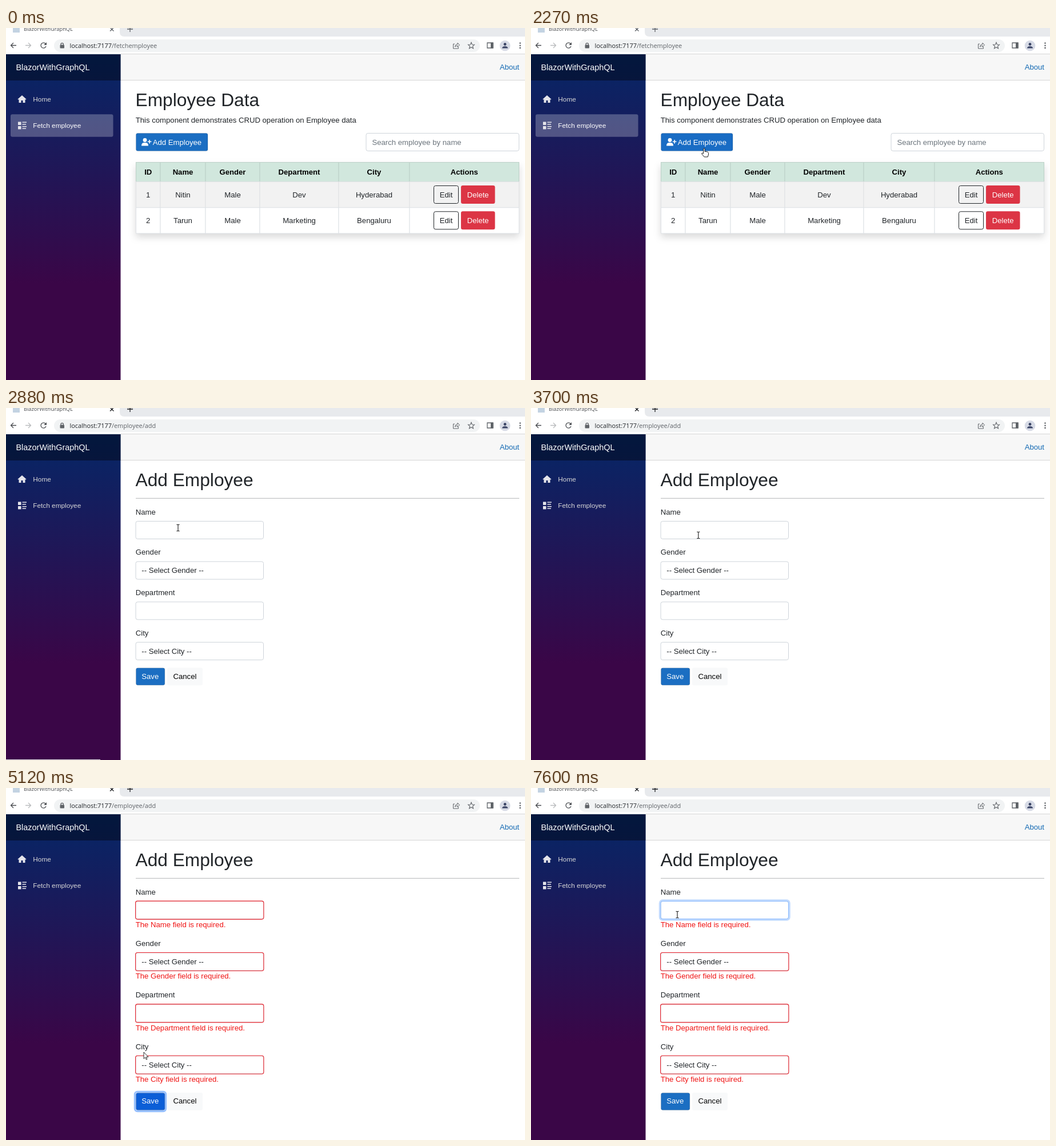
An HTML page for the animation above (8000 ms loop, 908 by 617 pixels).

```html
<!DOCTYPE html>
<html lang="en">
<head>
<meta charset="utf-8">
<title>Employee form</title>
<style>
html, body { margin: 0; height: 100%; overflow: hidden; background: #fff; }
svg { display: block; width: 100vw; height: 100vh; }
text { font: 13.13px "Liberation Sans", Arial, sans-serif; fill: #212529; white-space: pre; }
.chrome { font-family: "Open Sans", "Noto Sans", sans-serif; font-size: 10.9px; }
.title { font-size: 31.7px; }
.brand { font-size: 14.43px; fill: #fff; }
.nav { font-size: 11.8px; fill: #d7d7d7; }
.mid { text-anchor: middle; }
.head { font-weight: bold; fill: #000; }
.light { fill: #fff; }
.error { fill: #f01414; }
.line { fill: none; stroke: #5f6368; stroke-width: 1.3; }
.input { fill: #fff; stroke: #ced4da; }
.btn { stroke: #0002; }
.ring { fill: none; stroke-width: 3.3; }
</style>
</head>
<body>
<svg viewBox="0 0 908 617" preserveAspectRatio="none">
  <defs>
    <linearGradient id="side" x2="0" y2="1">
      <stop stop-color="#052767"/><stop offset=".7" stop-color="#3a0647"/>
    </linearGradient>
    <filter id="shadow" x="-10%" y="-20%" width="120%" height="160%">
      <feDropShadow dx="0" dy="6.6" stdDeviation="6.5" flood-opacity=".15"/>
    </filter>
  </defs>

  <!-- browser bar -->
  <path fill="#e8eaed" d="M199 0H908V15H207Q199 15 199 7z"/>
  <rect x="12" width="12" height="8" fill="#c3d3e2"/>
  <text class="chrome" x="31" y="5" style="font-size:9.25px;fill:#45474a">BlazorWithGraphQL</text>
  <path id="tabMarks" class="line" d="M182-1l6.5 6.5m0-6.5l-6.5 6.5M212 2h10M217-3v10"/>
  <rect x="84" y="20" width="745" height="22" rx="11" fill="#f1f3f4"/>
  <path class="line" d="M18 30.500H8.500m4.500-4.500-4.500 4.500 4.500 4.500" style="stroke:#4a4d51"/>
  <path class="line" d="M34 30.500h9.500m-4.500-4.500 4.500 4.500-4.500 4.500" style="stroke:#babcbe"/>
  <path class="line" d="M69.500 28a4.600 4.600 0 1 0 .5 4" style="stroke:#4a4d51"/>
  <path d="M71 25v4.800h-4.800z" fill="#4a4d51"/>
  <rect x="94.500" y="29.500" width="7.500" height="6" rx="1" fill="#5f6368"/>
  <path class="line" d="M96 30v-1.500a2.200 2.200 0 0 1 4.400 0V30"/>
  <text class="chrome" x="111.500" y="34.500">localhost:7177<tspan id="path" fill="#5f6368"></tspan></text>
  <path class="line" d="M785 28h-2.500v8h9v-2.500M785.500 33q.5-4.500 4.500-4.500v-2.500l3.500 3.800-3.500 3.700v-2.500q-3 0-4.500 2z" style="stroke-width:1"/>
  <path class="line" d="M814 25.300l1.500 3.700 4 .3-3 2.600 1 4-3.500-2.200-3.500 2.200 1-4-3-2.600 4-.3z" style="stroke-width:1.100"/>
  <path class="line" d="M842 26h10v9h-10z"/><path d="M848 25.500h4.500v10H848z" fill="#5f6368"/>
  <circle cx="873" cy="31" r="9.300" fill="#d7dbe6"/>
  <g fill="#3c4667"><circle cx="873" cy="28.500" r="2.400"/><path d="M868 35.500q0-3.500 5-3.500t5 3.500z"/></g>
  <g fill="#5f6368"><circle cx="899.500" cy="26.500" r="1.300"/><circle cx="899.500" cy="30.700" r="1.300"/><circle cx="899.500" cy="34.900" r="1.300"/></g>

  <!-- page frame -->
  <path fill="#f7f7f7" d="M200 46h708v45H200z"/>
  <path fill="#d6d5d5" d="M200 45h708v1H200zM200 91h708v1H200z"/>
  <text x="863.700" y="73" style="fill:#1269b3">About</text>
  <rect y="46" width="200.500" height="574" fill="url(#side)"/>
  <rect y="46" width="200.500" height="46" fill="#0006"/>
  <text class="brand" x="17.500" y="74">BlazorWithGraphQL</text>
  <rect id="active" x="8" y="151.300" width="179.500" height="39.500" rx="3.300" fill="#ffffff40"/>
  <g fill="#e4e4ea">
    <path d="M28 118l7.500 6.800-1 1-1-.8v6h-4v-4h-3v4h-4v-6l-1 .8-1-1z"/>
    <path d="M21 164.500h5.500v5.500H21zM21 172h5.500v5.500H21zM28.500 164.500H36v1.600h-7.500zM28.500 168H35v1.600h-6.500zM28.500 172H36v1.600h-7.500zM28.500 175.500H35v1.600h-6.500z"/>
  </g>
  <text class="nav" x="47.300" y="129">Home</text>
  <text class="nav" id="fetch" x="47.300" y="175">Fetch employee</text>

  <g id="listPage">
    <text class="title" x="226.500" y="137">Employee Data</text>
    <text x="226.800" y="165.600">This component demonstrates CRUD operation on Employee data</text>
    <rect class="ring" id="addRing" x="225.400" y="182.400" width="129.200" height="35" rx="4.600" stroke="#98c1fe"/>
    <rect class="btn" id="add" x="227.500" y="184.500" width="125.500" height="31" rx="3"/>
    <g fill="#fff">
      <circle cx="243" cy="196.500" r="3.400"/>
      <path d="M237 206.500q0-5.500 4.500-5.500h3q4.500 0 4.500 5.500zM250.300 196h1.600v2.500h2.500v1.600h-2.500v2.500h-1.600v-2.500h-2.500v-1.600h2.500z"/>
    </g>
    <text class="light" x="256.800" y="204.600">Add Employee</text>
    <rect class="input" x="630" y="184.500" width="267.500" height="31" rx="3.300"/>
    <text x="640.500" y="204.600" style="fill:#6c757d">Search employee by name</text>
    <g id="table"></g>
  </g>

  <g id="formPage">
    <text class="title" x="226.500" y="137">Add Employee</text>
    <path d="M227 157.800h671v1.200H227z" fill="#c3c4c5"/>
    <g id="fields"></g>
    <rect id="nameRing" class="ring" x="225.400" y="196.900" width="226.700" height="34.200" rx="4.800" stroke="#c2dbfe"/>
    <rect id="nameFocus" x="227" y="198.500" width="223.500" height="31" rx="3.300" fill="none" stroke="#86b7fe"/>
    <path id="caret" d="M237 206h1v15h-1z"/>
    <g id="buttons">
      <rect class="ring" id="saveRing" x="225.400" y="453.600" width="54.200" height="34.300" rx="4.600" stroke="#98c1fe"/>
      <rect class="btn" id="save" x="227.500" y="455.700" width="50.300" height="30" rx="3"/>
      <text class="light" x="237.300" y="474.600">Save</text>
      <rect x="282" y="455.200" width="62" height="31" rx="3.300" fill="#f8f9fa"/>
      <text x="292.500" y="474.600" style="fill:#000">Cancel</text>
    </g>
  </g>
  <path id="status" d="M0 616h165v1H0z" fill="#e4e6ea"/>
  <path id="cursor" stroke="#000"/>
</svg>
<script>
const $ = id => document.getElementById(id);
const show = (id, alpha) => $(id).style.opacity = +alpha;

const edges = [227.5, 270, 349, 444, 582, 706, 897.5];
const rows = [
  ['ID', 'Name', 'Gender', 'Department', 'City', 'Actions'],
  ['1', 'Nitin', 'Male', 'Dev', 'Hyderabad'],
  ['2', 'Tarun', 'Male', 'Marketing', 'Bengaluru'],
];
const bands = [
  [235.5, 34, '#d1e7dd', '#bcd0c7'],
  [269.5, 45.3, '#f2f2f2', '#dfe1e3'],
  [314.8, 45.2, '#fff', '#dee2e6'],
];
const tableRow = (cells, r) => {
  const [y, h, fill, stroke] = bands[r], base = y + h / 2 + 4.6, top = y + 7;
  const boxes = edges.slice(0, 6).map((x, i) =>
    `<rect x="${x}" y="${y}" width="${edges[i + 1] - x}" height="${h}" fill="${fill}" stroke="${stroke}"/>`);
  const labels = cells.map((cell, i) =>
    `<text class="mid ${r ? '' : 'head'}" x="${(edges[i] + edges[i + 1]) / 2}" y="${base}">${cell}</text>`);
  const actions = r ? `
    <rect x="748.5" y="${top}" width="43" height="31" rx="3" fill="none" stroke="#212529"/>
    <text class="mid" x="770" y="${base}">Edit</text>
    <rect x="796" y="${top - .5}" width="59.500" height="32" rx="3.300" fill="#dc3545"/>
    <text class="mid light" x="825.700" y="${base}">Delete</text>` : '';
  return boxes.join('') + labels.join('') + actions;
};
$('table').innerHTML =
  '<rect x="227" y="235" width="671" height="125" fill="#fff" filter="url(#shadow)"/>' + rows.map(tableRow).join('');

const fields = [['Name', ''], ['Gender', '-- Select Gender --'], ['Department', ''], ['City', '-- Select City --']];
$('fields').innerHTML = fields.map(([label, value]) => `<g>
  <text x="226.800" y="186.600">${label}</text>
  <rect class="input" x="227" y="198.500" width="223.500" height="31" rx="3.300"/>
  <text x="237.300" y="218.600">${value}</text>
  <g class="invalid">
    <rect x="226.600" y="198.100" width="224.300" height="32" rx="3.500" fill="none" stroke="#e8202a" stroke-width="1.100"/>
    <text class="error" x="226.800" y="244.100">The ${label} field is required.</text>
  </g></g>`).join('');
const fieldGroups = [...$('fields').children];
const invalidGroups = [...document.querySelectorAll('.invalid')];

// Pointer stops: time, x, y
const stops = [
  [1100, 899, 606], [1330, 534, 475], [1630, 534, 475], [2270, 303, 211], [2390, 301, 210],
  [3670, 301, 210], [3700, 293, 222], [4290, 246, 491], [4350, 246, 491], [4480, 241, 463],
  [6410, 241, 463], [6440, 242, 420], [7000, 256, 222],
];
const shapes = {
  arrow: ['M0 0v11.500l2.600-2.400 1.700 3.900 1.700-.7-1.700-3.800h3.700z', '#fff', .8],
  hand: ['M-1.300 9V1a1.200 1.200 0 0 1 2.400 0v4.500q3.600 0 5.400 1 1 .5 1 2v2.500l-1.300 4h-6L-4 10q-1-1.600.6-1.800z', '#fff', .9],
  beam: ['M-2.500-5.700h1.700l.8.6.8-.6h1.700M0-5.100V5.100M-2.500 5.700h1.700l.8-.6.8.6h1.700', 'none', 1],
};

const clamp = v => Math.min(1, Math.max(0, v));
const fade = (t, start, length = 150) => {
  const k = clamp((t - start) / length);
  return k * k * (3 - 2 * k);
};
const blue = k => `rgb(${[[27, 11], [110, 94], [194, 215]].map(([a, b]) => Math.round(a + (b - a) * k))})`;

function pointerAt(t) {
  const next = stops.findIndex(s => s[0] > t);
  if (next < 1) return stops.at(next).slice(1);
  const [t0, x0, y0] = stops[next - 1], [t1, x1, y1] = stops[next];
  const k = 1 - (1 - (t - t0) / (t1 - t0)) ** 2;
  return [x0 + (x1 - x0) * k, y0 + (y1 - y0) * k];
}

function pointerShape(t, x, y, step, shift) {
  const within = (x0, y0, w, h) => x >= x0 && x <= x0 + w && y >= y0 && y <= y0 + h;
  if (t < 2700) return within(227, 184, 126, 32) ? 'hand' : 'arrow';
  if (within(227, 198, 224, 32) || within(227, 198 + 2 * step, 224, 32)) return 'beam';
  return within(227, 455 + shift, 51, 31) ? 'hand' : 'arrow';
}

function draw(t) {
  const form = t >= 2820, invalid = t >= 5040, focused = t >= 7060;
  const step = invalid ? 90.4 : 70.7, shift = invalid ? 78.8 : 0;

  $('path').textContent = t < 2700 ? '/fetchemployee' : '/employee/add';
  $('tabMarks').style.stroke = t < 2700 ? '#5f6368' : '#202124';
  show('status', fade(t, 2700, 60) - fade(t, 3100, 130));
  $('listPage').style.display = form ? 'none' : '';
  $('formPage').style.display = form ? '' : 'none';
  show('active', !form);
  $('fetch').style.fill = form ? '#d7d7d7' : '#fff';

  $('add').style.fill = blue(fade(t, 2240));
  show('addRing', fade(t, 2520));

  fieldGroups.forEach((g, i) => g.setAttribute('transform', `translate(0 ${i * step})`));
  invalidGroups.forEach(g => g.style.display = invalid ? '' : 'none');
  invalidGroups[0].firstElementChild.style.display = focused ? 'none' : '';
  show('nameRing', fade(t, 7060));
  show('nameFocus', fade(t, 7060));
  show('caret', focused && t < 7600);

  $('buttons').setAttribute('transform', `translate(0 ${shift})`);
  $('save').style.fill = blue(clamp(fade(t, 4060) - fade(t, 4220) + fade(t, 4440) - fade(t, 7060)));
  show('saveRing', fade(t, 4950) - fade(t, 7060));

  const [x, y] = pointerAt(t), [d, fill, width] = shapes[pointerShape(t, x, y, step, shift)];
  const cursor = $('cursor');
  cursor.setAttribute('d', d);
  cursor.setAttribute('fill', fill);
  cursor.setAttribute('stroke-width', width);
  cursor.setAttribute('transform', `translate(${x} ${y})`);
  show('cursor', t >= 1100);
}

const start = performance.now();
function tick() {
  draw((performance.now() - start) % 8000);
  requestAnimationFrame(tick);
}
tick();
</script>
</body>
</html>
```
